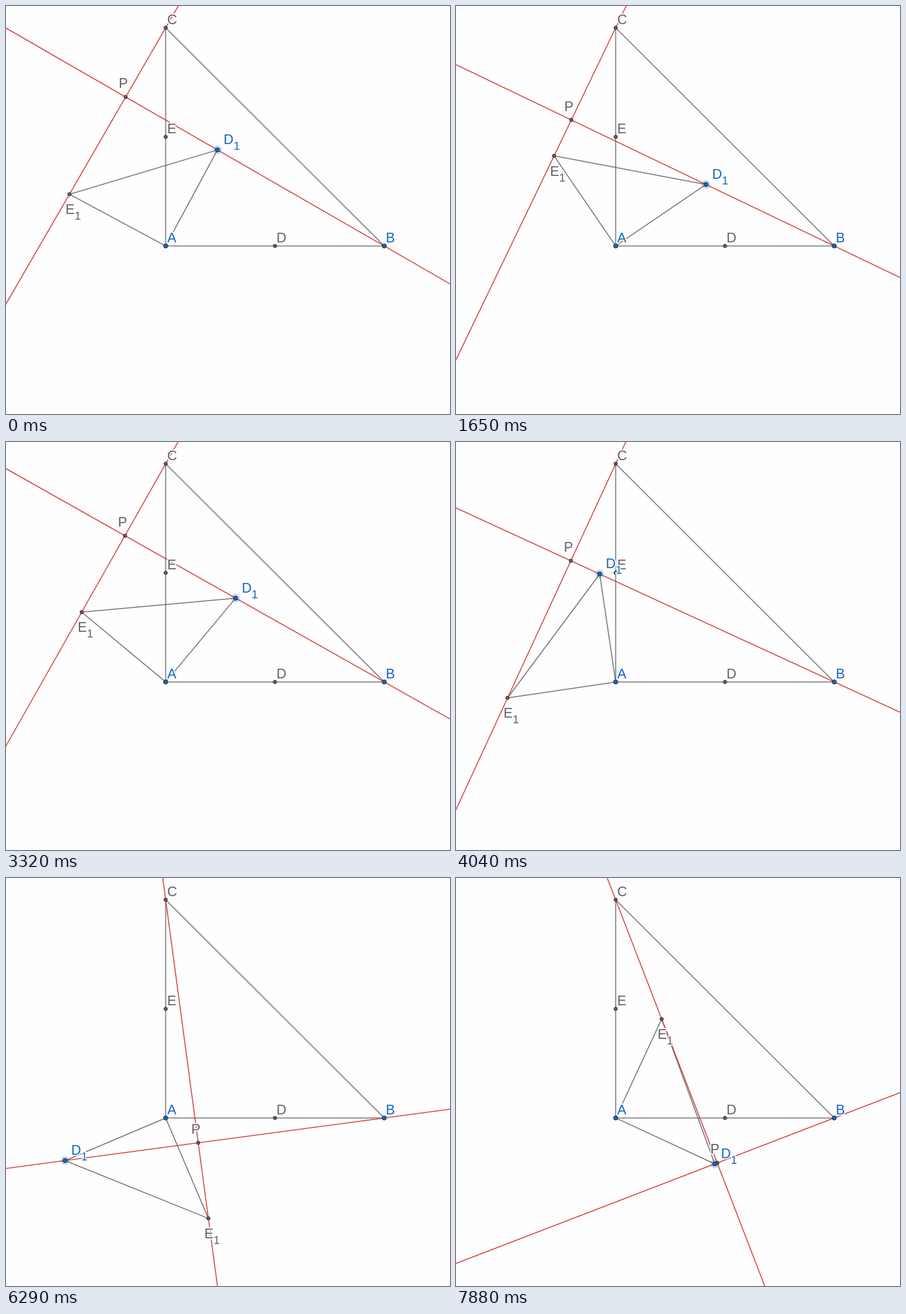
Animation, 780 px wide and 718 px high, one loop 7.99 s. Source, as an HTML page with a canvas:

```html
<!DOCTYPE html>
<html lang="en">
<head>
<meta charset="utf-8">
<title>Rotating triangle</title>
<style>
  html, body { margin: 0; width: 780px; height: 718px; overflow: hidden; background: #fefefe; }
  canvas { display: block; }
</style>
</head>
<body>
<canvas id="stage" width="780" height="718"></canvas>
<script>
const ctx = document.getElementById('stage').getContext('2d');
const LOOP = 7990, STEP = 118.4, FIRST_MOVE = 228, LAST_STEP = 65;
const GREY = '#616161', BLUE = '#1565c0', PAPER = '#fefefe';

const SIDE = 384, RADIUS = SIDE / 2;
const A = { x: 280.5, y: 422.3 };
const B = { x: A.x + SIDE, y: A.y }, C = { x: A.x, y: A.y - SIDE };
const D = { x: A.x + RADIUS, y: A.y }, E = { x: A.x, y: A.y - RADIUS };

// Poses of the hand-dragged point D1: [step, degrees around A]
const poses = [[0, 61.7], [3, 59.5], [13, 34.3], [22, 19.4], [33, 98.4], [42, 135],
  [52, 203], [LAST_STEP, 335.1]];

const slope = i => (poses[i + 1][1] - poses[i][1]) / (poses[i + 1][0] - poses[i][0]);

// Speed at a pose: the mean of its neighbouring slopes, weighted towards the nearer one.
function speed(i) {
  if (i === 0) return slope(0);
  if (i === poses.length - 1) return slope(i - 1);
  const before = poses[i][0] - poses[i - 1][0], after = poses[i + 1][0] - poses[i][0];
  return (slope(i - 1) * after + slope(i) * before) / (before + after);
}

// Smooth cubic curve through the poses
function angleAt(step) {
  const next = poses.findIndex(([s]) => s >= step && s > 0), i = next - 1;
  const [s0, a] = poses[i], [s1, b] = poses[next];
  const h = s1 - s0, u = (step - s0) / h, v = 1 - u;
  return v * v * (1 + 2 * u) * a + u * u * (3 - 2 * u) * b
    + h * u * v * (v * speed(i) - u * speed(next));
}

function segment(p, q, color = 'rgba(97,97,97,.82)') {
  ctx.strokeStyle = color;
  ctx.lineWidth = 1.8;
  ctx.beginPath();
  ctx.moveTo(p.x, p.y);
  ctx.lineTo(q.x, q.y);
  ctx.stroke();
}

function fullLine(p, q) {
  const k = 1500 / Math.hypot(q.x - p.x, q.y - p.y);
  const dx = (q.x - p.x) * k, dy = (q.y - p.y) * k;
  segment({ x: p.x - dx, y: p.y - dy }, { x: p.x + dx, y: p.y + dy }, 'rgba(211,47,47,.85)');
}

function disc(p, r, fill) {
  ctx.beginPath();
  ctx.arc(p.x, p.y, r, 0, 2 * Math.PI);
  ctx.fillStyle = fill;
  ctx.fill();
}

const setFont = size => { ctx.font = `${size}px "Liberation Sans", Arial, sans-serif`; };

function label([letter, index], x, y, color) {
  const glyphs = [[letter, 24, x, y]];
  setFont(24);
  if (index) glyphs.push([index, 20, x + ctx.measureText(letter).width, y + 10]);
  ctx.strokeStyle = PAPER;
  ctx.lineWidth = 4;
  ctx.lineJoin = 'round';
  ctx.fillStyle = color;
  for (const paint of ['strokeText', 'fillText']) {
    for (const [char, size, cx, cy] of glyphs) {
      setFont(size);
      ctx[paint](char, cx, cy);
    }
  }
}

function point(name, p, color, dx = 2.8, dy = -6.3) {
  disc(p, color === BLUE ? 3.8 : 3, color);
  ctx.strokeStyle = '#222';
  ctx.lineWidth = 1;
  ctx.stroke();
  label(name, p.x + dx, p.y + dy, color);
}

function draw(step) {
  const angle = angleAt(step) * Math.PI / 180;
  const dx = RADIUS * Math.cos(angle), dy = RADIUS * Math.sin(angle);
  const D1 = { x: A.x + dx, y: A.y - dy }, E1 = { x: A.x - dy, y: A.y - dx };

  // BD1 and CE1 are perpendicular, so P is the foot of C on BD1.
  const ux = D1.x - B.x, uy = D1.y - B.y;
  const k = ((C.x - B.x) * ux + (C.y - B.y) * uy) / (ux * ux + uy * uy);
  const P = { x: B.x + k * ux, y: B.y + k * uy };

  ctx.fillStyle = PAPER;
  ctx.fillRect(0, 0, 780, 718);
  for (const [p, q] of [[A, B], [B, C], [C, A], [A, D1], [D1, E1], [E1, A]]) segment(p, q);
  fullLine(B, D1);
  fullLine(C, E1);

  point('C', C, GREY);
  point('D', D, GREY);
  point('E', E, GREY);
  point('E1', E1, GREY, -7, 35);
  point('P', P, GREY, -12.3, -16);
  point('A', A, BLUE);
  point('B', B, BLUE);
  disc(D1, 8, 'rgba(21,101,192,.22)');
  point('D1', D1, BLUE, 10.8, -10);
}

function frame() {
  const time = performance.now() % LOOP;
  const step = Math.floor((time - FIRST_MOVE) / STEP) + 1;
  draw(Math.min(Math.max(step, 0), LAST_STEP));
  requestAnimationFrame(frame);
}
frame();
</script>
</body>
</html>
```
